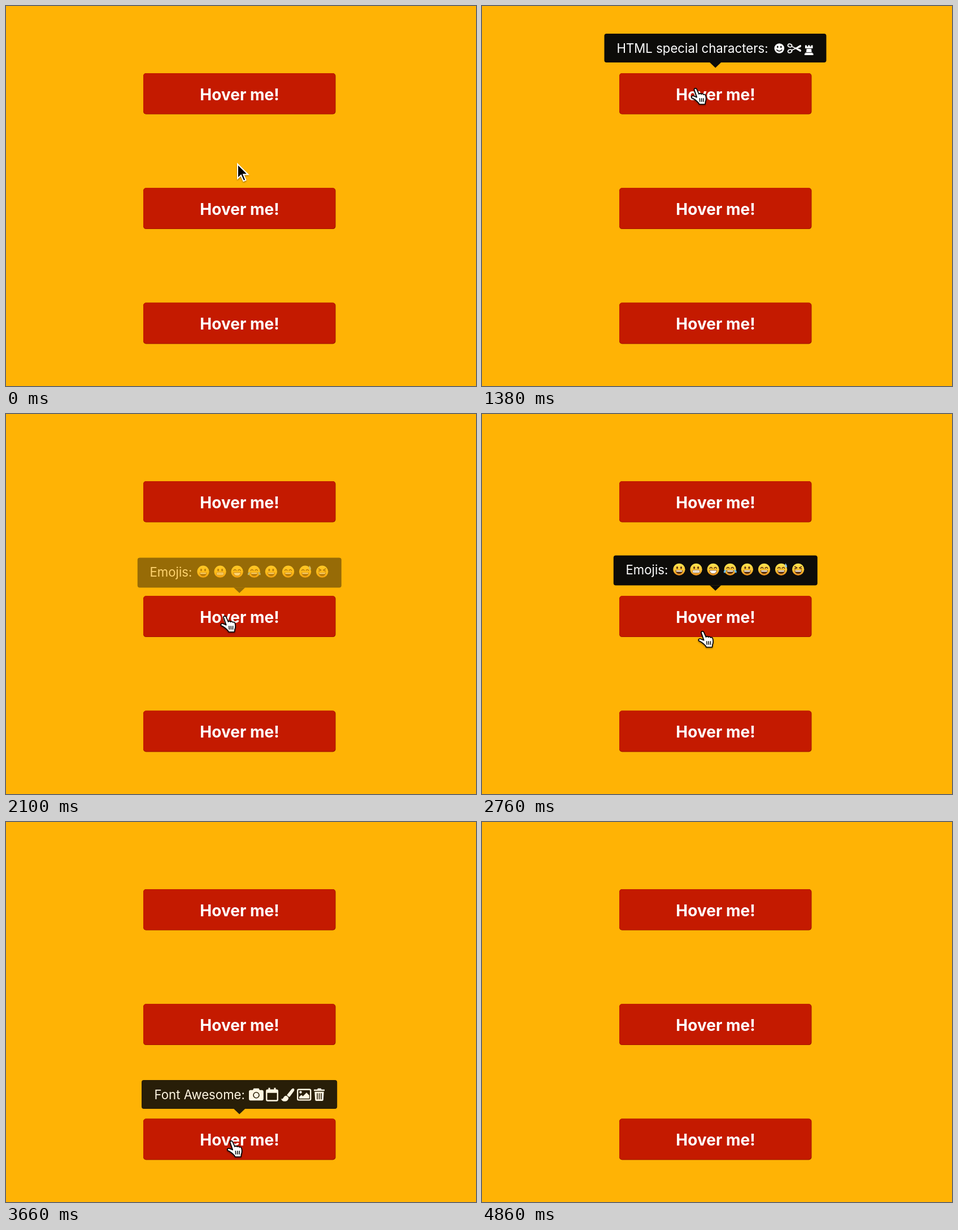
An HTML page that plays this animation: 832 by 673 pixels, repeating every 5520 ms.

```html
<!DOCTYPE html>
<html lang="en">
<head>
<meta charset="utf-8">
<title>Tooltips</title>
<style>
  html, body { margin: 0; width: 100%; height: 100%; overflow: hidden; background: #ffb305; }
  svg { display: block; width: 832px; height: 673px; }
  text { font-family: Inter, "Open Sans", sans-serif; fill: #fff; white-space: pre; }
  .label { font-size: 28px; font-weight: 700; text-anchor: middle; }
  .tip text { font-size: 22.2px; }
  .tip .box { fill: #0d0c09; }
  .line { fill: none; stroke: #fff; stroke-width: 2.4; stroke-linejoin: round; }
  .ink { fill: none; stroke: #5d3210; stroke-width: 1.6; stroke-linecap: round; stroke-linejoin: round; }
  .dark { fill: #5d3210; }
  .white { fill: #fff; }
  .cut { fill: #0d0c09; }
  .cutline { fill: none; stroke: #0d0c09; stroke-width: 1.6; }
</style>
</head>
<body>
<svg viewBox="0 0 832 673">
  <defs>
    <linearGradient id="skin" x2="0" y2="1">
      <stop offset="0" stop-color="#ffe552"/>
      <stop offset=".55" stop-color="#fdc535"/>
      <stop offset="1" stop-color="#e88a1c"/>
    </linearGradient>
    <filter id="shade" x="-50%" y="-50%" width="200%" height="200%">
      <feDropShadow dx="0" dy="1.5" stdDeviation="1.2" flood-opacity=".4"/>
    </filter>
  </defs>
  <g id="buttons"></g>
  <g id="tips"></g>
  <g id="arrow" filter="url(#shade)">
    <path d="M1 3V28.500L7 22.800 11.400 33 15.400 31.300 11.200 21.300H19.300Z" stroke="#fff" stroke-width="2"/>
  </g>
  <g id="hand" filter="url(#shade)">
    <path d="M-.3 2.500C-1 0 2.700-1.600 4.200 1.500L8 10C9 8.400 11.500 8.600 12.100 10.300
      13 9 15.500 9.200 16.100 11 17.200 10 19.500 10.600 20 13 21 17 21 20 19.600 23L19 28H8.700L7.500 25.800
      C5 23 0 18.500-4.600 16.700-6.200 14.500-4 12.400-1.500 13.200L4.200 15.600Z"
      fill="#fff" stroke="#000" stroke-width="1.700" stroke-linejoin="round"/>
    <path d="M9.300 17.300 9.800 23.800M12.700 17.300 12.900 23.800M16.100 17.300 16 23.800" stroke="#000" stroke-width="1.500"/>
  </g>
</svg>
<script>
const LOOP = 5520, STEP = 60, FADE = 180, SHIFT = 6.8;
const $ = id => document.getElementById(id);
const buttonTops = [119, 322.3, 525.6], buttonHeight = 72.8;

$('buttons').innerHTML = buttonTops.map(y => `
  <rect x="243" y="${y}" width="340.5" height="${buttonHeight}" rx="5" fill="#9b1500"/>
  <rect x="243" y="${y}" width="339.7" height="${buttonHeight - .9}" rx="5" fill="#c41a00"/>
  <text class="label" x="413.5" y="${y + 47.5}">Hover me!</text>`).join('');

// Emoji parts, centred on the face
const eyes = {
  oval: '<ellipse class="dark" cx="-3.5" cy="-3" rx="1.5" ry="2.3"/><ellipse class="dark" cx="3.5" cy="-3" rx="1.5" ry="2.3"/>',
  arc: '<path class="ink" d="M-6-2Q-3.800-5.500-1.700-2M1.700-2Q3.800-5.500 6-2"/>',
  shut: '<path class="ink" d="M-6-5-2-2.800-6-1M6-5 2-2.800 6-1"/>'
};
const mouths = {
  open: '<path class="dark" d="M-6.500 1.500H6.500Q5.500 7.800 0 7.800T-6.500 1.500Z"/><path class="white" d="M-5.500 2H5.500L5 4H-5Z"/>',
  teeth: '<rect class="white" x="-6.500" y="1" width="13" height="5.200" rx="2.500" stroke="#9a6420" stroke-width=".8"/><path d="M-6 3.600H6M-3 1V6M0 1V6M3 1V6" stroke="#b9a587" stroke-width=".6"/>',
  grin: '<path class="white" d="M-6.500 1.500H6.500Q5.500 7.500 0 7.500T-6.500 1.500Z" stroke="#8a4f18" stroke-width=".9"/>'
};
const tears = '<path fill="#62b8f2" d="M-7 0Q-13 2-11 6-8 7-7 0ZM7 0Q13 2 11 6 8 7 7 0Z"/>';
const sweat = '<path fill="#8fc4e8" d="M7.500-11Q12-5 9.500-3.500 5.500-3 7.500-11Z"/>';
const faces = [
  ['oval', 'open'], ['oval', 'teeth'], ['arc', 'grin'], ['arc', 'open', tears],
  ['oval', 'open'], ['arc', 'open'], ['arc', 'open', sweat], ['shut', 'open']
];
const emojis = faces.map(([eye, mouth, extra = ''], i) =>
  `<g transform="translate(${349 + i * 30.1} 275.3)"><circle r="10.6" fill="url(#skin)"/>${eyes[eye]}${mouths[mouth]}${extra}</g>`).join('');

const symbols = `
  <g transform="translate(526.3 75)"><circle class="white" r="8.800"/>
    <ellipse class="cut" cx="-3" cy="-2.600" rx="1.300" ry="1.900"/><ellipse class="cut" cx="3" cy="-2.600" rx="1.300" ry="1.900"/>
    <path class="cutline" d="M-5 2.300Q0 7.800 5 2.300"/></g>
  <g transform="translate(553 75)" class="line" style="stroke-width:1.800">
    <ellipse cx="-8" cy="-5" rx="3.600" ry="2.700" transform="rotate(20 -8 -5)"/>
    <ellipse cx="-8" cy="5" rx="3.600" ry="2.700" transform="rotate(-20 -8 5)"/>
    <path d="M-5-3.500 1-.8 10.500 5.200Q12 4 10 2.500L1-.8M-5 3.500 1 .8 10.500-5.200Q12-4 10-2.500L1 .8"/></g>
  <path class="white" d="M572 69.500H575V71.800H577V69.500H580.500V71.800H582.500V69.500H585.500V75H583L583.600 82H585V84H586.500V87H571V84H572.500V82H574L574.600 75H572Z"/>
  <path class="cutline" style="stroke-width:.9" d="M574 75.300H583.500M573 82.400H584.500"/>`;

const icons = `
  <path class="white" d="M433 474H437L438.500 471H447.500L449 474H453Q455.800 474 455.800 477V489.500Q455.800 492.500 453 492.500H433Q430 492.500 430 489.500V477Q430 474 433 474Z"/>
  <circle class="cutline" cx="443" cy="483" r="5"/>
  <rect class="line" x="461.300" y="474" width="19.500" height="18.800" rx="2"/>
  <path class="white" d="M461 473.500H481V479H461ZM464.500 470H467.500V475H464.500ZM474.500 470H477.500V475H474.500Z"/>
  <path class="white" d="M509.200 471.300Q511.500 473 509.500 476L502 486.200Q499.500 486 497.200 482.800L505.500 472.500Q507.500 470.300 509.200 471.300ZM496 484Q499 485 500.300 488 499.500 494 493 494 488 494 487 489.300 490 490.500 491.200 487.500 492.500 484 496 484Z"/>
  <rect class="line" x="516.200" y="473" width="23" height="18.600" rx="2"/>
  <circle class="white" cx="521.500" cy="477.800" r="2.200"/>
  <path class="white" d="M519 489V486L523 482.500 525.500 485 532 478.500 536.800 483.500V489Z"/>
  <path class="white" d="M545 473H551L552 471H557.500L558.500 473H564V475.500H545ZM546.300 477H562.700L561.800 491Q561.700 493.200 559.500 493.200H549.500Q547.300 493.200 547.200 491Z"/>
  <path class="cutline" d="M551 479.500V490.500M554.500 479.500V490.500M558 479.500V490.500"/>`;

// Box, text place, art, then the start of fade in and fade out
const tips = [
  { x: 216.5, y: 49, w: 393, h: 51, tx: 238.5, ty: 83, text: 'HTML special characters:', art: symbols, show: 717, hide: 1715 },
  { x: 232.8, y: 250.5, w: 361, h: 53, tx: 254.5, ty: 284.3, text: 'Emojis:', art: emojis, show: 2050, hide: 3110 },
  { x: 240, y: 456.2, w: 346.2, h: 51, tx: 262.5, ty: 490.2, text: 'Font Awesome:', art: icons, show: 3530, hide: 4665 }
];
$('tips').innerHTML = tips.map(({ x, y, w, h, tx, ty, text, art }) => `
  <g class="tip"><rect class="box" x="${x}" y="${y}" width="${w}" height="${h}" rx="4"/>
  <path class="box" d="M403 ${y + h - .2}H423.400L413.200 ${y + h + 9.5}Z"/>
  <text x="${tx}" y="${ty}">${text}</text>${art}</g>`).join('');
const tipNodes = [...$('tips').children];

// Pointer path: time, x, y
const path = [
  [0, 409, 277], [60, 407, 270], [180, 402, 246], [300, 393, 212], [420, 384, 170],
  [540, 377, 132], [900, 377, 132], [1260, 376, 139], [1380, 376, 146], [1540, 378, 192],
  [1700, 382, 258], [1860, 385, 333], [2100, 385.5, 358], [2460, 387, 372], [2760, 388.5, 385],
  [2930, 390, 396], [3060, 391, 450], [3350, 394, 527], [3600, 397, 565], [4080, 397, 565],
  [4500, 396, 599], [4620, 397, 627], [4740, 398, 680], [LOOP, 398, 680]
];

function pointerAt(t) {
  const i = path.findIndex(p => p[0] > t);
  const [t0, x0, y0] = path[i - 1], [t1, x1, y1] = path[i];
  const k = (t - t0) / (t1 - t0);
  return [x0 + (x1 - x0) * k, y0 + (y1 - y0) * k];
}

const easeOut = k => 1 - (1 - Math.min(1, Math.max(0, k))) ** 1.7;

function draw(t) {
  tips.forEach(({ show, hide }, i) => {
    const p = easeOut((t - show) / FADE) - easeOut((t - hide) / FADE);
    tipNodes[i].setAttribute('opacity', p);
    tipNodes[i].setAttribute('transform', `translate(0 ${SHIFT * (1 - p)})`);
  });
  const [x, y] = pointerAt(t);
  const over = buttonTops.some(top => y >= top && y <= top + buttonHeight);
  for (const id of ['arrow', 'hand']) {
    $(id).setAttribute('transform', `translate(${x} ${y})`);
    $(id).setAttribute('visibility', over === (id === 'hand') ? 'visible' : 'hidden');
  }
}

const start = performance.now();
function tick() {
  const t = (performance.now() - start) % LOOP;
  draw(Math.floor(t / STEP) * STEP);
  requestAnimationFrame(tick);
}
tick();
</script>
</body>
</html>
```
